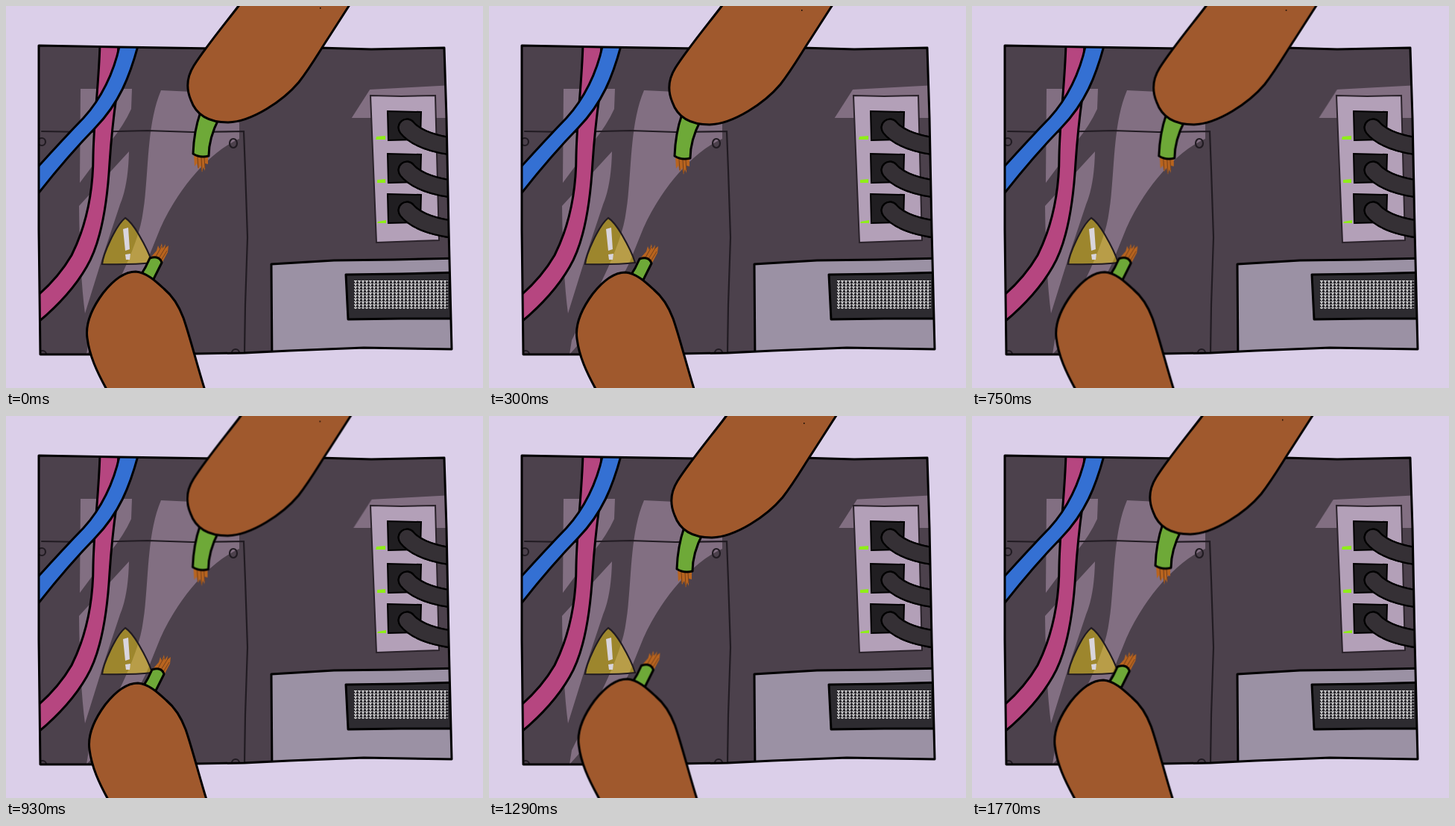
An HTML page without scripts for the animation above (1.8 s loop, 640x512 px).

```html
<!DOCTYPE html>
<html lang="en">
<head>
<meta charset="utf-8">
<title>Open wires</title>
<style>
  html, body { margin: 0; width: 100%; height: 100%; overflow: hidden; background: #dbcfe9; }
  svg { display: block; width: 100vw; height: 100vh; }
  .ink { stroke: #000; stroke-width: 3; stroke-linejoin: round; stroke-linecap: round; }
  .thin { fill: none; stroke: #211b22; stroke-width: 2.2; stroke-linecap: round; }
  .lit { fill: #826f82; }
  .skin { fill: #a0592d; }
  .green { fill: #6ea938; }
  .copper { fill: #b8641f; }
  .strand { fill: none; stroke: #74401b; stroke-width: 1; }

  .top, .low { animation: top 1.8s infinite; }
  .low { animation-name: low; }

  /* handheld shake, redrawn every 30 ms */
  @keyframes top {
    0%      { transform: translate(0, 0);       animation-timing-function: steps(10, end); }
    16.667% { transform: translate(-2px, 3px);  animation-timing-function: steps(8, end); }
    30%     { transform: translate(0, 1px);     animation-timing-function: steps(13, end); }
    51.667% { transform: translate(-.5px, 4.5px); animation-timing-function: steps(12, end); }
    71.667% { transform: translate(1px, 7px);   animation-timing-function: steps(9, end); }
    86.667% { transform: translate(.8px, 1.5px); animation-timing-function: steps(7, end); }
    98.333% { transform: translate(-5px, 2.5px);  animation-timing-function: steps(1, end); }
    100%    { transform: translate(0, 0); }
  }
  @keyframes low {
    0%      { transform: translate(0, 0);       animation-timing-function: steps(10, end); }
    16.667% { transform: translate(9px, 1px);   animation-timing-function: steps(8, end); }
    30%     { transform: translate(5.7px, -1px);  animation-timing-function: steps(13, end); }
    51.667% { transform: translate(3px, 2px);   animation-timing-function: steps(12, end); }
    71.667% { transform: translate(11.5px, -3.5px); animation-timing-function: steps(9, end); }
    86.667% { transform: translate(6px, -3px);  animation-timing-function: steps(7, end); }
    98.333% { transform: translate(2.3px, -2px);  animation-timing-function: steps(1, end); }
    100%    { transform: translate(0, 0); }
  }
</style>
</head>
<body>
<svg viewBox="0 0 640 512" preserveAspectRatio="none">
  <defs>
    <path id="box" d="M44 53 L150 55 L280 57 L420 56 L490 58 L588 56 L591 150 L594 300 L598 460 L480 458 L380 462 L320 465 L200 467 L46 467 L44 300 Z"/>
    <clipPath id="inside"><use href="#box"/></clipPath>
    <clipPath id="gleam"><path d="M440 114 L488 112 L600 106 V150 H440 Z"/></clipPath>
    <pattern id="mesh" x="467" y="368" width="5" height="4" patternUnits="userSpaceOnUse">
      <path d="M0 0H4V1H0ZM1 1.6H3V3H1Z" fill="#fff"/>
    </pattern>
    <g id="plug">
      <path d="M512 141 L557 142 L556 179 L513 180 Z" fill="#201e21" stroke="#000" stroke-width="2"/>
      <g fill="none" stroke-linecap="round">
        <path id="cord" d="M538 163 C546 173 565 184 604 189" stroke="#000" stroke-width="25"/>
        <use href="#cord"/>
        <path d="M538 163 C546 173 565 184 604 189" stroke="#353035" stroke-width="20.5"/>
      </g>
    </g>
  </defs>

  <rect width="640" height="512" fill="#dbcfe9"/>

  <g clip-path="url(#inside)">
    <use href="#box" fill="#4c414c"/>

    <!-- reflections -->
    <g class="lit">
      <path d="M100 111 H169 L168 138 Q158 160 140 182 L99 237 Z"/>
      <path d="M165 195 Q164 240 153 266 L130 335 L106 412 Q99 360 98 268 Z"/>
      <path d="M208 113 L250 115 L300 130 L313 157 V178 C270 197 228 250 207 298 L188 345 L150 420 L108 467 L111 448 C140 390 178 325 184 275 C192 225 188 160 208 113 Z"/>
      <g clip-path="url(#gleam)"><path class="top" d="M501 92 H640 V170 H451 Z"/></g>
    </g>

    <!-- cover plate -->
    <g class="thin">
      <path d="M48 168 L110 169 L190 167 L250 169 L319 168 L321 220 L324 310 L321 400 L320 465"/>
      <ellipse cx="305" cy="184" rx="5" ry="6"/>
      <ellipse cx="48" cy="182" rx="5" ry="5"/>
      <ellipse cx="49" cy="467" rx="5" ry="5"/>
      <ellipse cx="308" cy="465" rx="5" ry="5"/>
    </g>

    <!-- warning sign -->
    <path d="M160 284 Q168 289 178 306 Q192 330 196 344 Q170 347 129 346 Q130 335 140 314 Q151 291 160 284 Z" fill="#eecb0e" fill-opacity=".5"/>
    <path class="thin" d="M160 284 Q168 289 178 306 Q192 330 196 344 Q170 347 129 346 Q130 335 140 314 Q151 291 160 284 Z"/>
    <path d="M157 299 L164 297 L166 326 L160 328 Z M160 333 L167 332 L166 340 L161 340 Z" fill="#d9d5dd"/>

    <!-- loose cables -->
    <path class="ink" fill="#b64680" d="M126 50 C125 100 118 150 117 200 C117 255 105 300 88 334 Q70 365 38 392 L38 428 Q85 390 108 350 C132 310 137 245 139 210 Q142 165 148 122 L151 50 Z"/>
    <path class="ink" fill="#3470d3" d="M153 50 C145 90 127 125 104 150 Q75 180 38 221 L38 258 Q80 204 120 163 C152 130 166 95 178 50 Z"/>

    <!-- power strip -->
    <path d="M489 120 L530 121 L576 120 L581 314 L497 317 Z" fill="#b3a0b8" stroke="#2a222a" stroke-width="2"/>
    <path d="M497 175 L509 174 V179 H496 Z M498 233 L509 232 V237 H498 Z M499 289 L510 287 V291 H498 Z" fill="#8fee18"/>
    <use href="#plug"/>
    <use href="#plug" y="57"/>
    <use href="#plug" y="111"/>

    <!-- vent -->
    <path class="ink" fill="#9b91a4" d="M356 346 L440 341 L520 340 L610 338 V480 H357 Z"/>
    <path class="ink" fill="#2d2b30" d="M456 360 L530 359 L610 357 V419 L530 419 L459 420 Z"/>
    <path fill="url(#mesh)" d="M467 368 H593 V406 H467 Z"/>
  </g>
  <use href="#box" class="ink" fill="none"/>

  <g class="top">
    <path class="copper" d="M252 198 L253 215 L256 211 L258 219 L261 214 L263 223 L265 216 L267 221 L267 211 L271 212 L271 198 Z"/>
    <path class="strand" d="M257 203 L258 217 M262 203 L263 221 M266 203 L267 217"/>
    <path class="ink green" d="M261 142 Q252 168 251 198 Q260 204 272 201 Q272 177 286 150 Z"/>
    <path class="ink skin" d="M327 -20 L312 0 C292 26 268 55 252 80 C242 96 242 112 248 126 C255 146 272 156 298 156 C330 155 372 127 393 102 C410 80 421 60 433 42 L460 0 L473 -20 Z"/>
    <path d="M421 2 h1.5 v1.5 h-1.5 Z"/>
  </g>

  <g class="low">
    <path class="copper" d="M194 337 L202 328 L204 321 L206 326 L209 318 L210 325 L214 319 L213 325 L218 321 L217 330 L209 345 Z"/>
    <path class="strand" d="M201 336 L209 322 M205 338 L215 322 M208 341 L216 328"/>
    <path class="ink green" d="M180 362 Q188 350 193 338 Q206 334 209 344 L195 372 Z"/>
    <path class="ink skin" d="M146 535 L134 512 C122 490 112 469 109 445 C106 424 116 404 130 385 C145 366 160 356 174 356 C188 357 200 368 212 379 C224 389 232 402 238 418 C247 444 256 480 266 512 L273 535 Z"/>
  </g>
</svg>
</body>
</html>
```
